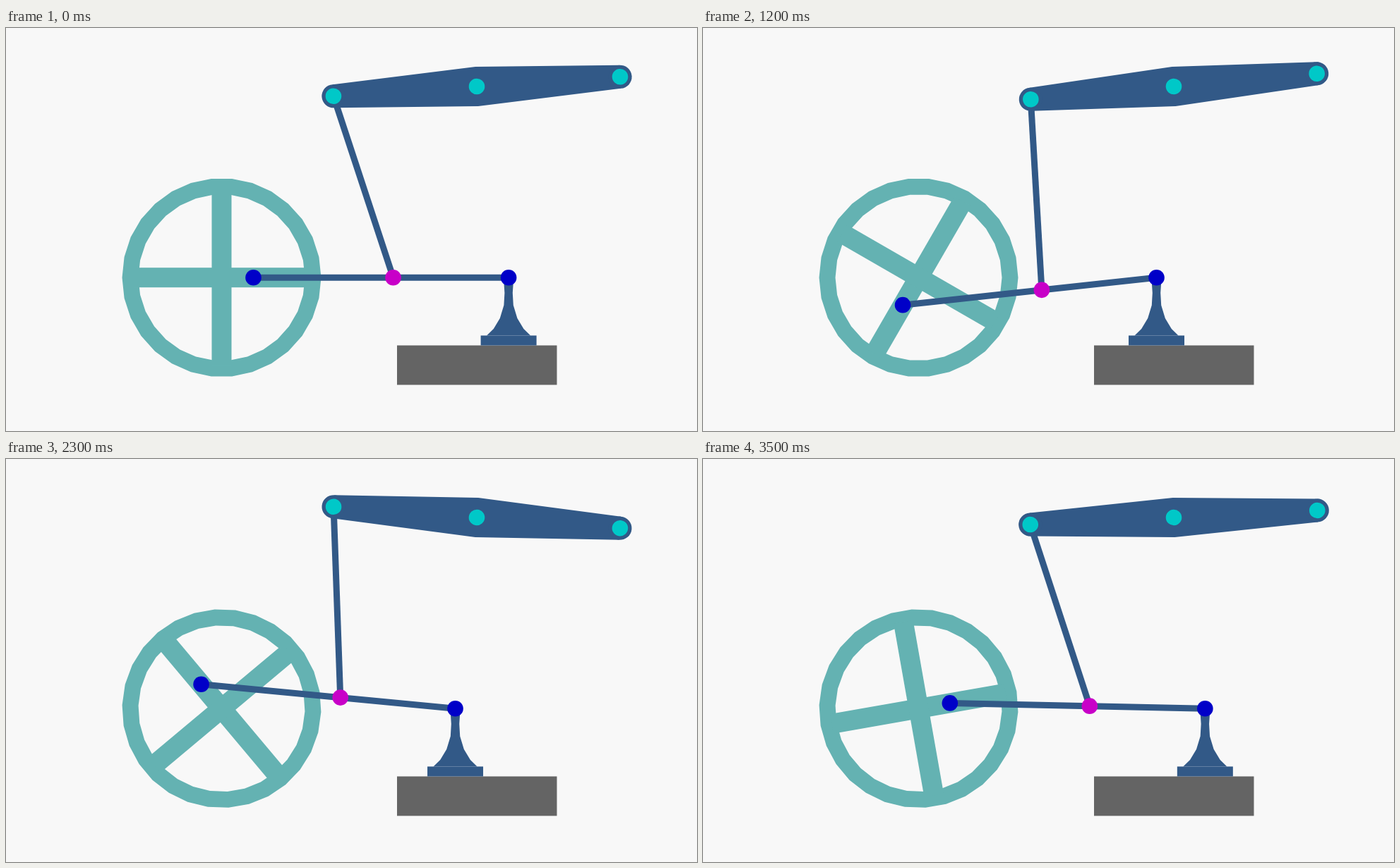
These frames come from a looping animation (979x572 px, 3600 ms). An HTML page with a canvas:

```html
<!DOCTYPE html>
<html>
<head>
<meta charset="utf-8">
<style>
html, body { margin: 0; height: 100%; overflow: hidden; background: #f8f8f8; }
canvas { display: block; }
</style>
</head>
<body>
<canvas id="stage" width="979" height="572"></canvas>
<script>
const ctx = document.getElementById('stage').getContext('2d');
const STEEL = '#325987', TEAL = '#64b2b2', CYAN = '#00c8c8', BLUE = '#0000c8', PINK = '#c800c8';
const TAU = Math.PI * 2;
const hub = { x: 305.5, y: 354.2 }, pivot = { x: 667, y: 83 };
const CRANK = 45, ROD = 361.6, JOINT = 0.5477, LINK = 271, ARM = 203.5;

function disc(p, r, color) {
  ctx.fillStyle = color;
  ctx.beginPath();
  ctx.arc(p.x, p.y, r, 0, TAU);
  ctx.fill();
}

function bar(a, b) {
  ctx.strokeStyle = STEEL;
  ctx.lineWidth = 9;
  ctx.beginPath();
  ctx.moveTo(a.x, a.y);
  ctx.lineTo(b.x, b.y);
  ctx.stroke();
}

function box(x, y, w, h, color) {
  ctx.fillStyle = color;
  ctx.fillRect(x, y, w, h);
}

function polygon(points) {
  points.forEach(([x, y], i) => i ? ctx.lineTo(x, y) : ctx.moveTo(x, y));
  ctx.closePath();
}

const ring = r => Array.from({ length: 30 }, (_, i) =>
  [r * Math.cos(i * TAU / 30), r * Math.sin(i * TAU / 30)]);

function at(p, angle, paint) {
  ctx.save();
  ctx.translate(p.x, p.y);
  ctx.rotate(angle);
  paint();
  ctx.restore();
}

function wheel() {
  ctx.fillStyle = TEAL;
  ctx.beginPath();
  polygon(ring(141));
  polygon(ring(118));
  ctx.fill('evenodd');
  box(-125, -14, 250, 28, TEAL);
  box(-14, -125, 28, 250, TEAL);
}

function beam() {
  ctx.fillStyle = STEEL;
  ctx.beginPath();
  polygon([[-ARM, -16.6], [0, -28], [ARM, -16.6], [ARM, 16.6], [0, 28], [-ARM, 16.6]]);
  ctx.fill();
  for (const x of [-ARM, ARM]) disc({ x, y: 0 }, 16.6, STEEL);
  for (const x of [-ARM, 0, ARM]) disc({ x, y: 0 }, 11.3, CYAN);
}

// Half widths of the stand from top to bottom
const profile = [[6.5, 354], [6.5, 364], [5.7, 376], [6.7, 393.5], [12.3, 412], [21.3, 427], [31, 436.6]];

function stand(x) {
  const right = profile.map(([w, y]) => [x + w, y]);
  const left = profile.map(([w, y]) => [x - w, y]).reverse();
  ctx.fillStyle = STEEL;
  ctx.beginPath();
  polygon([...right, ...left]);
  ctx.fill();
  box(x - 39.5, 436.5, 79, 14, STEEL);
}

function draw(now) {
  const turn = Math.floor(now % 3600 / 100) * TAU / 36;
  const crank = { x: hub.x + CRANK * Math.cos(turn), y: hub.y + CRANK * Math.sin(turn) };
  const slider = { x: crank.x + Math.sqrt(ROD ** 2 - (crank.y - hub.y) ** 2), y: hub.y };
  const joint = {
    x: crank.x + JOINT * (slider.x - crank.x),
    y: crank.y + JOINT * (slider.y - crank.y)
  };
  // The beam angle follows from the triangle pivot, joint, beam end
  const dx = joint.x - pivot.x, dy = joint.y - pivot.y, d = Math.hypot(dx, dy);
  const tilt = Math.atan2(dy, dx) + Math.acos((ARM ** 2 + d * d - LINK ** 2) / (2 * ARM * d));
  const end = { x: pivot.x + ARM * Math.cos(tilt), y: pivot.y + ARM * Math.sin(tilt) };

  box(0, 0, 979, 572, '#f8f8f8');
  at(hub, turn, wheel);
  box(554, 450.5, 226.5, 56, '#646464');
  stand(slider.x);
  bar(end, joint);
  bar(crank, slider);
  at(pivot, tilt, beam);
  disc(crank, 11.3, BLUE);
  disc(slider, 11.3, BLUE);
  disc(joint, 11.3, PINK);
}

let start;
function tick(now) {
  start ??= now;
  draw(now - start);
  requestAnimationFrame(tick);
}
draw(0);
requestAnimationFrame(tick);
</script>
</body>
</html>
```
